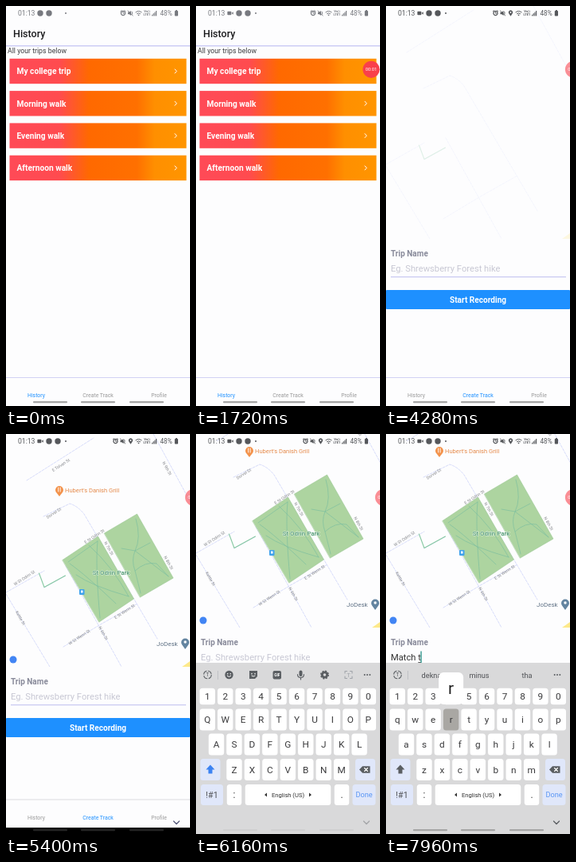
An HTML page that plays this animation: 231x500 px, repeating every 8000 ms.

```html
<!DOCTYPE html>
<html lang="en">
<head>
<meta charset="utf-8">
<title>Trip recorder</title>
<style>
html, body { margin: 0; width: 100%; height: 100%; overflow: hidden; background: #fdfdfe; }
svg { display: block; width: 231px; height: 500px; font-family: Roboto, "Noto Sans", sans-serif; }
text { white-space: pre; }
.line { fill: none; stroke-linecap: round; stroke-linejoin: round; }
</style>
</head>
<body>
<svg id="stage" viewBox="0 0 231 500"></svg>
<script>
const LOOP = 8000;
const RECORD = 600, SWITCH = 3920, FOCUS = 5360, PAN = 5600, KEYBOARD = 5760;
const BLUE = '#1e90ff';

const text = (x, y, s, size, fill, more = '') =>
  `<text x="${x}" y="${y}" font-size="${size}" fill="${fill}" ${more}>${s}</text>`;
const mid = (x, y, s, size, fill, more = '') => text(x, y, s, size, fill, 'text-anchor="middle" ' + more);
const rect = (x, y, w, h, fill, r = 0, more = '') =>
  `<rect x="${x}" y="${y}" width="${w}" height="${h}" rx="${r}" fill="${fill}" ${more}/>`;
const line = (d, stroke, w = 1, more = '') =>
  `<path class="line" d="${d}" stroke="${stroke}" stroke-width="${w}" ${more}/>`;
const shape = (d, fill) => `<path d="${d}" fill="${fill}"/>`;
const dot = (x, y, r, fill) => `<circle cx="${x}" cy="${y}" r="${r}" fill="${fill}"/>`;
const group = (id, body, more = '') => `<g id="${id}" ${more}>${body}</g>`;
const at = (x, y, body) => `<g transform="translate(${x} ${y})">${body}</g>`;
const chevron = (x, y, color) => line(`M${x - 3.5} ${y - 2}l3.5 3.5 3.5 -3.5`, color, 1.3);

// History page
const trips = ['My college trip', 'Morning walk', 'Evening walk', 'Afternoon walk'];
const history = rect(0, 0, 231, 500, '#fdfdfe') +
  text(9, 39, 'History', 12.5, '#1c1c1e', 'font-weight="500"') +
  rect(0, 49, 231, 1.6, '#cfcff6') +
  text(2, 59, 'All your trips below', 8.75, '#3c3c40') +
  trips.map((name, i) => at(0, 40.3 * i,
    rect(4.5, 65.8, 222, 31.4, 'url(#sunset)') +
    text(13.5, 85.3, name, 10.2, '#fff', 'font-weight="700"') +
    line('M212 79l2.3 2.5 -2.3 2.5', '#fff', 1))).join('');

// Map
const street = (x, y, name, angle) =>
  `<g transform="translate(${x} ${y}) rotate(${angle})">${mid(0, 1.7, name, 5.2, '#85878c')}</g>`;
const roads = line('M47 103L80 87Q90 90 98 100L190 256M75 165L145 291M0 198L48 171M48 192L75 177' +
    'M185 0L231 84M0 200L55 291M72 266L117 239 165 212M26 58L110 5',
    '#d3d9fa', .9, 'stroke-dasharray="3 1.5"') +
  line('M41.5 174L48 191.5 74.5 177', '#86c9a2', 1.1) +
  shape('M221 291l10 -7v7z', '#fde98a');
const lawns = 'M71 157.5L115.5 128 160.5 206 117 235zM123.5 124L164.5 100 210 180 168.5 204z';
const park = shape(lawns, '#add4a0') + line(lawns, '#9cc896', .6) +
  line('M78 160Q98 146 115 134M80 162Q100 176 138 212M115 134Q112 165 118 230M88 176Q108 190 154 203' +
    'M104 139Q134 166 154 203M163 106Q170 130 162 146L204 178M162 146Q157 158 162 171L169 199' +
    'M162 171Q175 159 189 162L204 178M145 143L162 146 181 136', '#7dbfa0', .7);
const labels = street(69, 39, 'E Tolvan St', -33) + street(60, 99, 'Dorvel St', -33) +
  street(111, 128, 'E St Odrin St', -33) + street(23, 180, 'W St Odrin St', -33) +
  street(149, 222, 'E St Wenn St', -33) + street(92, 254, 'W St Wenn St', -33) +
  street(129, 143, 'N 7th St', 60) + street(202, 43, 'N 9th St', 60) +
  street(204, 161, 'N 8th St', 60) + street(122, 249, 'N 6th St', 60) +
  street(18, 230, 'Kettle St', 60) +
  mid(132, 176, 'St Odrin Park', 8, '#3a8a66', 'stroke="#e5f3e5" stroke-width="1" paint-order="stroke"') +
  text(74, 73, "Hubert's Danish Grill", 7.6, '#e58a4b') +
  shape('M67 78l-3.5 -4.5a5 5 0 1 1 7 0z', '#f3924b') +
  line('M65.7 67v5M68.2 67v5', '#fff', .9) +
  text(189, 265, 'JoDesk', 8, '#627487') +
  shape('M225 269l-3.6 -5a5 5 0 1 1 7.2 0z', '#6384a0') + dot(225, 260, 1.7, '#fff') +
  rect(92, 194, 6.5, 7, '#3fa2ec', 1) + rect(94, 195.5, 2.5, 3, '#fff') +
  dot(9, 282, 4.5, '#4285f4');

const create = rect(0, 0, 231, 492, '#fdfdfe') +
  group('roads', roads) + group('park', park) + group('labels', labels) +
  rect(0, 291, 231, 201, '#fdfdfe') +
  text(6, 313.3, 'Trip Name', 10, '#888a9a', 'font-weight="700"') +
  group('hint', text(6, 331.8, 'Eg. Shrewsberry Forest hike', 11.2, '#c8c8d4')) +
  `<text id="typed" x="6" y="332" font-size="11.2" fill="#333"></text>` +
  rect(6, 334, 0, .8, '#333', 0, 'id="composing"') +
  rect(5.5, 320.5, 1.2, 14.5, '#13877c', 0, 'id="caret"') +
  rect(6, 338, 220, 1.3, '#cbcbf2', 0, 'id="underline"') +
  rect(0, 355, 231, 24, BLUE, 1) +
  mid(115.5, 371, 'Start Recording', 10.1, '#fff', 'font-weight="700"');

// Tabs and system bars
const tabs = rect(0, 464, 231, 36, '#fdfdfe') + rect(0, 464, 231, 1, '#d2d2f4', 0, 'id="tabLine"') +
  mid(38, 489, 'History', 6.9, BLUE, 'id="tabHistory"') +
  mid(115.5, 489, 'Create Track', 6.9, '#999', 'id="tabCreate"') +
  mid(192, 489, 'Profile', 6.9, '#999');
const pills = [34, 94, 155].map(x => rect(x, 494, 43, 2.2, 'currentColor', 1)).join('');

const alarm = '<circle r="2.6" fill="none" stroke="currentColor" stroke-width="1.2"/>' +
  line('M0 -1.4V.2H1M-3.2 -2.2l1.4 -1.2M3.2 -2.2l-1.4 -1.2', 'currentColor', .9);
const mute = shape('M-3 -1.3h1.8L1 -3V3L-1.2 1.3H-3z', 'currentColor') +
  line('M-3 -3L3.2 3M2.2 -1.8Q3.2 0 2.2 1.4', 'currentColor', .9);
const wifi = line('M-3.6 -1.2Q0 -4.2 3.6 -1.2M-2.1 .6Q0 -1.2 2.1 .6', 'currentColor', 1) + dot(0, 2.3, .9, 'currentColor');
const pinIcon = shape('M0 3.8L-2.2 .6A2.7 2.7 0 1 1 2.2 .6z', 'currentColor') + dot(0, -1, .9, '#fff');
const camera = rect(-3.6, -2.2, 5, 4.4, 'currentColor', .8) + shape('M1.7 0L3.8 -1.8V1.8z', 'currentColor');
const status = text(15, 12.2, '01:13', 8.6, 'currentColor') +
  group('camera', at(43, 9, camera)) +
  group('notices', dot(43, 9, 3.7, 'currentColor') + dot(54, 9, 3.7, 'currentColor')) +
  dot(75, 9, 1, 'currentColor') +
  group('alerts', at(147, 9, alarm) + at(156, 9, mute)) +
  group('place', at(156.5, 9, pinIcon)) +
  at(166.5, 9, wifi) +
  mid(177, 8.4, 'Vo))', 4, 'currentColor', 'font-weight="700"') +
  mid(177, 12.3, 'LTE1', 4, 'currentColor', 'font-weight="700"') +
  [0, 1, 2, 3].map(i => rect(183 + i * 1.7, 10.8 - i * 1.6, 1.1, 1.6 + i * 1.6, 'currentColor')).join('') +
  text(193.5, 12.2, '48%', 8.2, 'currentColor') +
  rect(211.8, 6, 4.2, 6.6, 'currentColor', .8) + rect(213, 5, 1.8, 1.2, 'currentColor');

// Keyboard
const keys = {};
const PALE = '#e0e7fa';
const keyBox = (x, y, w, h, fill = '#fff') => rect(x - w / 2, y - h / 2, w, h, fill, 3.5);
function keyRow(chars, x0, y, h) {
  return [...chars].map((c, i) => {
    const x = x0 + 22.45 * i;
    keys[c] = { x, y };
    return rect(x - 9.7, y - h / 2, 19.4, h, '#fff', 3.5, `data-key="${c}"`) +
      mid(x, y + 4, c, 11.8, '#3a3a3c', `data-label="${c}"`);
  }).join('');
}
const INK = '#5a5e62';
const ring = `<circle r="4.8" fill="none" stroke="${INK}" stroke-width="1.1" stroke-dasharray="6 1.54"/>`;
const tools = at(41.5, 301, dot(0, 0, 5.2, INK) + dot(-1.8, -1.3, .8, '#fff') + dot(1.8, -1.3, .8, '#fff') +
    line('M-2.3 1.3Q0 4 2.3 1.3', '#fff', 1)) +
  at(72, 301, shape('M-5 -5H5V2L2 5H-5z', INK) + dot(-2, -1.2, .8, '#fff') + dot(2, -1.2, .8, '#fff') +
    line('M-2 1.3Q0 3 2 1.3', '#fff', .9)) +
  rect(96.5, 296, 10.5, 10.5, INK, 2) + mid(101.8, 303, 'GIF', 4.8, '#fff', 'font-weight="700"') +
  at(131.5, 301, rect(-2, -5.5, 4, 7.5, INK, 2) + line('M-4 -.5Q-4 3.5 0 3.5T4 -.5M0 3.5V6', INK, 1.1)) +
  at(161.5, 301, `<circle r="3.2" fill="none" stroke="${INK}" stroke-width="2.8"/>` +
    `<circle r="4.8" fill="none" stroke="${INK}" stroke-width="1.4" stroke-dasharray="2.1 1.67"/>`) +
  at(191.5, 301, line('M-4.5 -2V-4.5H-2M4.5 2V4.5H2M-4.5 2V4.5H-2', '#a0a4aa', 1.1) +
    mid(0, 2.5, 'T', 7, '#a0a4aa') + line('M2 -4.5H4.5V-2', '#a0a4aa', 1.1));
const words = ['a', 'b', 'c'].map((n, i) =>
  mid([57, 117, 177][i], 305, '', 9.2, '#505256', `id="word${n}"`)).join('');
const keyboard = rect(0, 286, 231, 214, '#d9d9da') +
  at(14.5, 301, ring + mid(0, 2.3, 'T', 6.5, INK)) +
  rect(27, 296, .8, 11, '#b9bbc0') + group('tools', tools) + group('words', words) +
  [-3.3, 0, 3.3].map(d => dot(215 + d, 301, 1, INK)).join('') +
  keyRow('1234567890', 14.3, 328, 20.5) + keyRow('qwertyuiop', 14.3, 357, 27) +
  keyRow('asdfghjkl', 25.5, 388, 27) + keyRow('zxcvbnm', 48, 419.5, 27) +
  keyBox(18, 419.5, 25, 27, PALE) +
  `<path id="shift" d="M18 413.5l5.5 6H20.5v5h-5v-5H12.5z"/>` +
  keyBox(212.5, 419.5, 25, 27, PALE) +
  shape('M205 419.5l4 -4.3h9.5v8.6H209z', INK) + line('M211.5 417.5l4 4M215.5 417.5l-4 4', '#fff', 1.1) +
  keyBox(20, 451, 28, 26, PALE) + mid(20, 455, '!#1', 10.8, '#505256') +
  keyBox(48, 451, 18.5, 26) + mid(48, 454.5, ':', 12, '#333') +
  keyBox(115.5, 451, 107.5, 26) + mid(115.5, 453.7, 'English (US)', 7.6, '#333') +
  shape('M89 448.6v4.8l-3 -2.4zM142 448.6v4.8l3 -2.4z', '#333') +
  keyBox(183, 451, 18.5, 26) + mid(183, 454.5, '.', 12, '#333') +
  keyBox(211, 451, 29, 26, PALE) + mid(211, 454.3, 'Done', 9.2, '#5c97f5') +
  group('hideKeys', chevron(214, 486, INK));

const stage = document.getElementById('stage');
stage.innerHTML = `<defs><linearGradient id="sunset">` +
  [[0, '#ff4a57'], [.28, '#ff4b4f'], [.45, '#ff6900'], [.72, '#ff7000'], [.82, '#ff8f00'], [1, '#ff9500']]
    .map(([o, c]) => `<stop offset="${o}" stop-color="${c}"/>`).join('') + `</linearGradient></defs>` +
  group('backdrop', rect(0, 0, 231, 500, '#000')) + group('history', history) + group('create', create) +
  group('tabs', tabs) + group('navBar', rect(0, 492, 231, 8, '#000')) +
  group('navArrow', chevron(214, 486, 'currentColor')) +
  group('status', status) + group('keyboard', keyboard) + group('pills', pills) +
  group('popup', rect(-15.5, -20, 31, 40, '#fff', 6) +
    mid(0, 7, '', 21, '#222', 'id="popupText"')) +
  group('badge', dot(0, 0, 10.6, '#f9404b') + mid(0, 2.1, '', 5.8, '#fff', 'id="timer"'));

const el = {};
stage.querySelectorAll('[id]').forEach(node => el[node.id] = node);
const keyBoxes = [...stage.querySelectorAll('[data-key]')];
const keyLabels = [...stage.querySelectorAll('[data-label]')];

const strokes = [[6480, 'M'], [6720, 'a'], [6960, 't'], [7160, 'c'], [7360, 'h'], [7560, ' '], [7800, 't'], [7960, 'r']];
const COMMIT = 80, HOLD = 120;
const guesses = [[0, '', '', ''], [1, 'My', 'Me', 'May'], [3, 'Mat', 'Match', 'Matter'],
  [5, 'Match', 'Matches', 'Matched'], [6, 'dekna', 'minus', 'tha']];

const show = (id, on) => el[id].style.display = on ? '' : 'none';
const move = (id, x, y) => el[id].setAttribute('transform', `translate(${x} ${y})`);
const progress = (t, start, length) => Math.min(1, Math.max(0, (t - start) / length));
const ease = p => 1 - (1 - p) ** 2;

function drawTyping(t) {
  const typed = strokes.filter(([time]) => t >= time + COMMIT).map(s => s[1]).join('');
  const pressed = strokes.find(([time, c]) => c !== ' ' && t >= time && t < time + HOLD);
  const upper = !typed;

  el.typed.textContent = typed;
  const width = typed ? el.typed.getComputedTextLength() : 0;
  const wordStart = typed.lastIndexOf(' ') + 1;
  const startX = wordStart ? el.typed.getSubStringLength(0, wordStart) : 0;
  el.composing.setAttribute('x', 6 + startX);
  el.composing.setAttribute('width', Math.max(0, width - startX));
  el.caret.setAttribute('x', 5.5 + width);
  show('caret', t >= PAN && (t >= strokes[0][0] || (t - PAN) % 1040 < 520));
  show('hint', !typed);
  show('tools', !typed);
  show('words', typed);

  const guess = guesses.filter(g => g[0] <= typed.length).pop();
  ['worda', 'wordb', 'wordc'].forEach((id, i) => el[id].textContent = guess[i + 1]);
  el.shift.setAttribute('fill', upper ? '#3c83f2' : INK);
  keyLabels.forEach(n => n.textContent = upper ? n.dataset.label.toUpperCase() : n.dataset.label);

  const active = pressed && pressed[1].toLowerCase();
  keyBoxes.forEach(n => n.setAttribute('fill', n.dataset.key === active ? '#a9a7a3' : '#fff'));
  show('popup', pressed);
  if (pressed) {
    const { x, y } = keys[active];
    move('popup', Math.min(214, Math.max(17, x)), y - 39);
    el.popupText.textContent = pressed[1];
  }
}

function draw(t) {
  const creating = t >= SWITCH, focused = t >= FOCUS, panned = t >= PAN;
  show('history', !creating);
  show('create', creating);
  el.roads.style.opacity = progress(t, 4240, 160);
  el.park.style.opacity = progress(t, 4440, 160);
  el.labels.style.opacity = progress(t, 4640, 160);
  move('create', 0, -49 * ease(progress(t, PAN, 100)));

  show('tabs', !panned);
  move('tabs', 0, focused ? -7.5 : 0);
  el.tabHistory.setAttribute('fill', creating ? '#999' : BLUE);
  el.tabCreate.setAttribute('fill', creating ? BLUE : '#999');
  el.tabLine.setAttribute('fill', focused ? '#dcdce2' : '#d2d2f4');
  el.underline.setAttribute('fill', panned ? '#c3cbb4' : '#cbcbf2');
  show('navBar', focused);
  show('navArrow', focused);
  el.navArrow.style.color = panned ? '#3c3c3c' : '#55597a';

  const recording = t >= RECORD;
  show('camera', recording);
  move('notices', recording ? 11 : 0, 0);
  show('place', t >= 4200);
  move('alerts', t >= 4200 ? -9.5 : 0, 0);
  el.status.style.color = creating ? '#55575b' : '#77797f';

  const dock = progress(t, 3440, 300);
  show('badge', recording);
  move('badge', 220 + 15.5 * dock, 79.3);
  el.badge.style.opacity = progress(t, RECORD, 160) * (1 - .42 * dock);
  el.timer.textContent = '00:0' + Math.floor(Math.max(0, t - RECORD) / 1000);

  const raised = ease(progress(t, KEYBOARD, 220));
  const settled = progress(t, 6120, 240);
  show('keyboard', t >= KEYBOARD);
  move('keyboard', 0, 214 * (1 - raised));
  el.hideKeys.style.opacity = .3 + .7 * settled;
  el.pills.style.color = focused && t < KEYBOARD ? '#242424' : '#a5a5a5';
  el.pills.style.opacity = t < KEYBOARD ? 1 : settled;
  drawTyping(t);
}

const start = performance.now();
function tick() {
  draw((performance.now() - start) % LOOP);
  requestAnimationFrame(tick);
}
tick();
</script>
</body>
</html>
```
